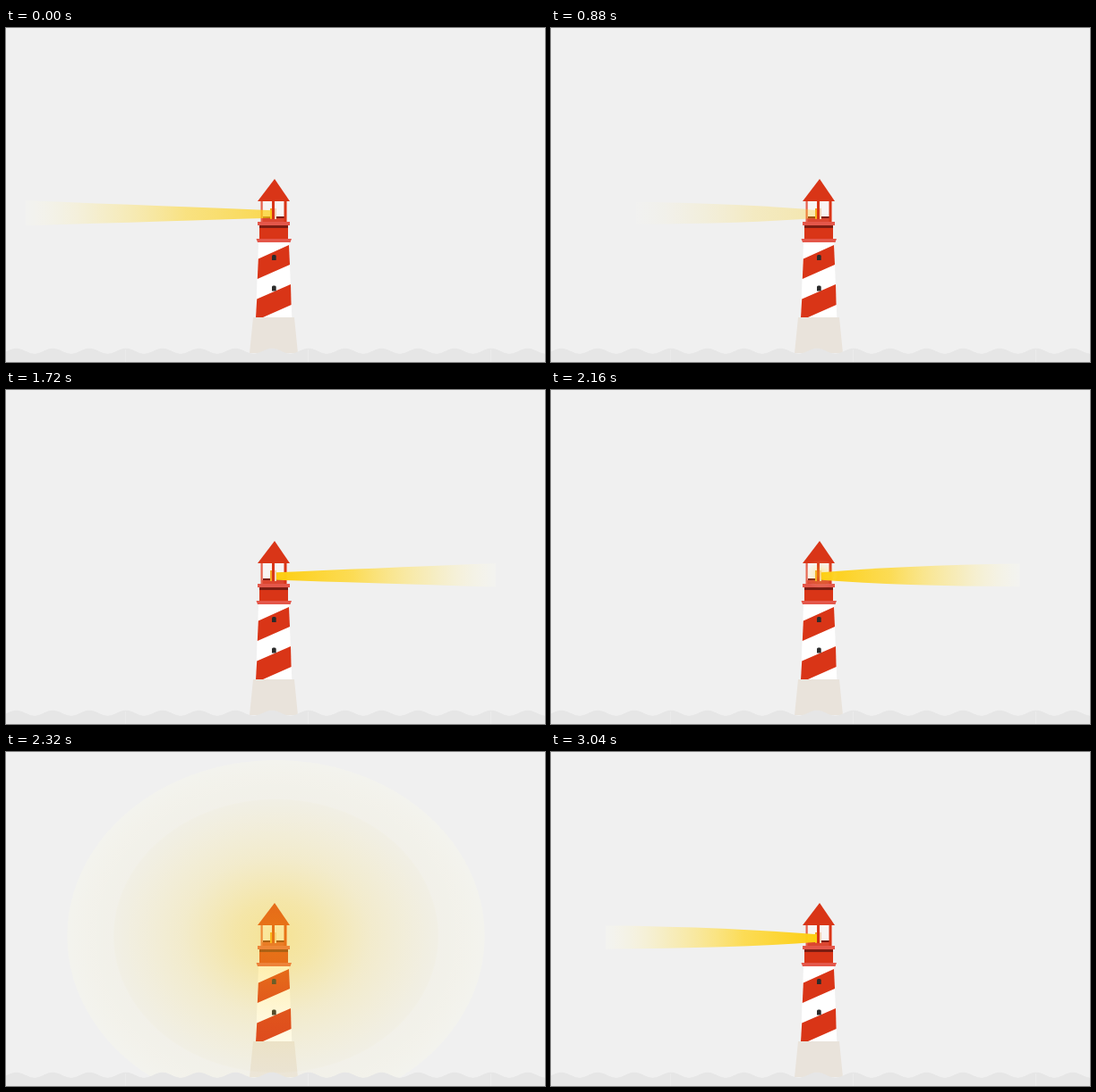
Recreate the animation shown at these times as an HTML page with a canvas. Size 602 px wide and 374 px high, loop 3.08 s.

```html
<!DOCTYPE html>
<html lang="en">
<head>
<meta charset="utf-8">
<title>Lighthouse</title>
<style>
  html, body { margin: 0; width: 100%; height: 100%; overflow: hidden; background: #f0f0f0; }
  canvas { display: block; }
</style>
</head>
<body>
<canvas id="stage" width="602" height="374"></canvas>
<script>
const ctx = document.getElementById('stage').getContext('2d');
const LOOP = 3080, STEP = 40;
const RED = '#d93517', PINK = '#e4574a', DARK = '#7c1c11', WHITE = '#fff';

// Smooth rise from 0 to 1 between two times
function rise(from, to, t) {
  const u = Math.min(1, Math.max(0, (t - from) / (to - from)));
  return u * u * (3 - 2 * u);
}

function poly(color, ...xy) {
  ctx.fillStyle = color;
  ctx.beginPath();
  for (let i = 0; i < xy.length; i += 2) ctx.lineTo(xy[i], xy[i + 1]);
  ctx.fill();
}

function rect(color, x, y, w, h) {
  ctx.fillStyle = color;
  ctx.fillRect(x, y, w, h);
}

function drawSea() {
  ctx.fillStyle = '#e6e6e6';
  ctx.beginPath();
  ctx.moveTo(0, 374);
  for (let x = 0; x <= 602; x++) {
    ctx.lineTo(x, 361.7 - 3 * Math.cos((x - 11.5) / 40.8 * 2 * Math.PI));
  }
  ctx.lineTo(602, 374);
  ctx.fill();
  for (let x = 133; x < 602; x += 204) rect('#ebebeb', x, 360, 1, 14);
}

function drawWindow(y) {
  ctx.fillStyle = '#2b2b2b';
  ctx.beginPath();
  ctx.roundRect(297, y, 4.7, 6, [1.5, 1.5, 0, 0]);
  ctx.fill();
}

function drawTower() {
  poly('#e9e3db', 276, 324, 322, 324, 326, 364, 272, 364);
  poly(WHITE, 282, 240, 316, 240, 319.3, 324, 279, 324);
  poly(RED, 281.8, 258.5, 316, 243, 317, 265, 280.8, 281);
  poly(RED, 280.2, 303.5, 318, 287, 318.6, 310, 287, 324, 279, 324);
  drawWindow(254);
  drawWindow(288.5);
  rect(RED, 283, 224, 32, 12);
  poly(PINK, 279.5, 236, 319, 236, 317.5, 240, 281, 240);
  rect(DARK, 283, 221, 32, 3);

  rect('#f8f4f3', 285, 194, 29, 20);
  rect(DARK, 287, 211, 8, 2);
  rect(DARK, 302, 211, 9, 2);
  rect('#dc4630', 285, 213, 29, 4);
  rect(PINK, 281, 217, 36, 4);
  rect('#e6604c', 284.5, 194, 2.2, 23);
  rect(RED, 310.5, 194, 2.5, 23);
  rect('#eb8878', 313, 194, 1, 23);
  rect('#f5a623', 295, 202, 5, 12);
  rect('#f3d3b8', 300, 202, 2, 12);
  poly(RED, 300, 169, 317, 194, 281, 194);
}

// The sides are straight when bulge is 0 and bow outwards up to 1
function drawBeam(dir, length, alpha, bulge) {
  if (alpha <= 0) return;
  const x0 = dir < 0 ? 298 : 302, x1 = 300 + dir * length;
  const y0 = 208.5, y1 = 207.3, near = 4.3;
  const far = 11.5 + (length - 160) * .021;
  const bend = .4, xm = x0 + (x1 - x0) * bend, ym = y0 + (y1 - y0) * bend;
  const straight = near + (far - near) * bend;
  const mid = straight + (far * .9 - straight) * bulge;

  const fade = ctx.createLinearGradient(x0, 0, x1, 0);
  fade.addColorStop(0, 'rgba(253,206,16,1)');
  fade.addColorStop(.35, 'rgba(254,216,56,.84)');
  fade.addColorStop(.7, 'rgba(255,232,125,.44)');
  fade.addColorStop(1, 'rgba(255,255,240,.2)');
  ctx.globalAlpha = alpha;
  ctx.fillStyle = fade;
  ctx.beginPath();
  ctx.moveTo(x0, y0 - near);
  ctx.quadraticCurveTo(xm, ym - mid, x1, y1 - far);
  ctx.lineTo(x1, y1 + far);
  ctx.quadraticCurveTo(xm, ym + mid, x0, y0 + near);
  ctx.fill();
  ctx.globalAlpha = 1;
}

const bulgeAt = (t, rest) => Math.min(1, Math.abs(t - rest) / 200);

function drawLeftBeam(t) {
  const leaving = t < LOOP / 2;
  const length = leaving ? 278 - 12 * (t / 560) ** 4 : 200 + 39 * rise(2360, 3040, t);
  const alpha = leaving ? (.72 + .28 * rise(0, 300, t)) * (1 - rise(600, 1040, t))
                        : rise(2360, 2540, t);
  drawBeam(-1, length, alpha, bulgeAt(t, 0));
}

function drawRightBeam(t) {
  const length = 252 * Math.cos((t - 1850) / 645);
  const alpha = rise(1000, 1420, t) * (1 - rise(2160, 2290, t));
  drawBeam(1, length, alpha, bulgeAt(t, 1720));
}

function drawGlow(t) {
  const u = (t - 2120) / 440;
  if (u <= 0 || u >= 1) return;
  const scale = Math.sin(Math.PI * u) ** 2;
  ctx.save();
  ctx.translate(301.5, 206);
  ctx.scale(238 * scale, 201 * scale);
  const light = ctx.createRadialGradient(0, 0, 0, 0, 0, 1);
  light.addColorStop(0, 'rgba(253,208,20,.42)');
  light.addColorStop(.2, 'rgba(253,210,30,.34)');
  light.addColorStop(.45, 'rgba(253,215,50,.19)');
  light.addColorStop(.77, 'rgba(253,226,90,.08)');
  light.addColorStop(.78, `rgba(255,244,190,${.08 + .06 * scale})`);
  light.addColorStop(1, `rgba(255,255,230,${.22 * scale})`);
  ctx.fillStyle = light;
  ctx.beginPath();
  ctx.arc(0, 0, 1, 0, 2 * Math.PI);
  ctx.fill();
  ctx.restore();
}

const start = performance.now();

function draw() {
  const elapsed = (performance.now() - start) % LOOP;
  const t = Math.floor(elapsed / STEP) * STEP;
  rect('#f0f0f0', 0, 0, 602, 374);
  drawTower();
  drawLeftBeam(t);
  drawRightBeam(t);
  rect(RED, 297, 194, 3, 20);
  drawGlow(t);
  drawSea();
  requestAnimationFrame(draw);
}
draw();
</script>
</body>
</html>
```
